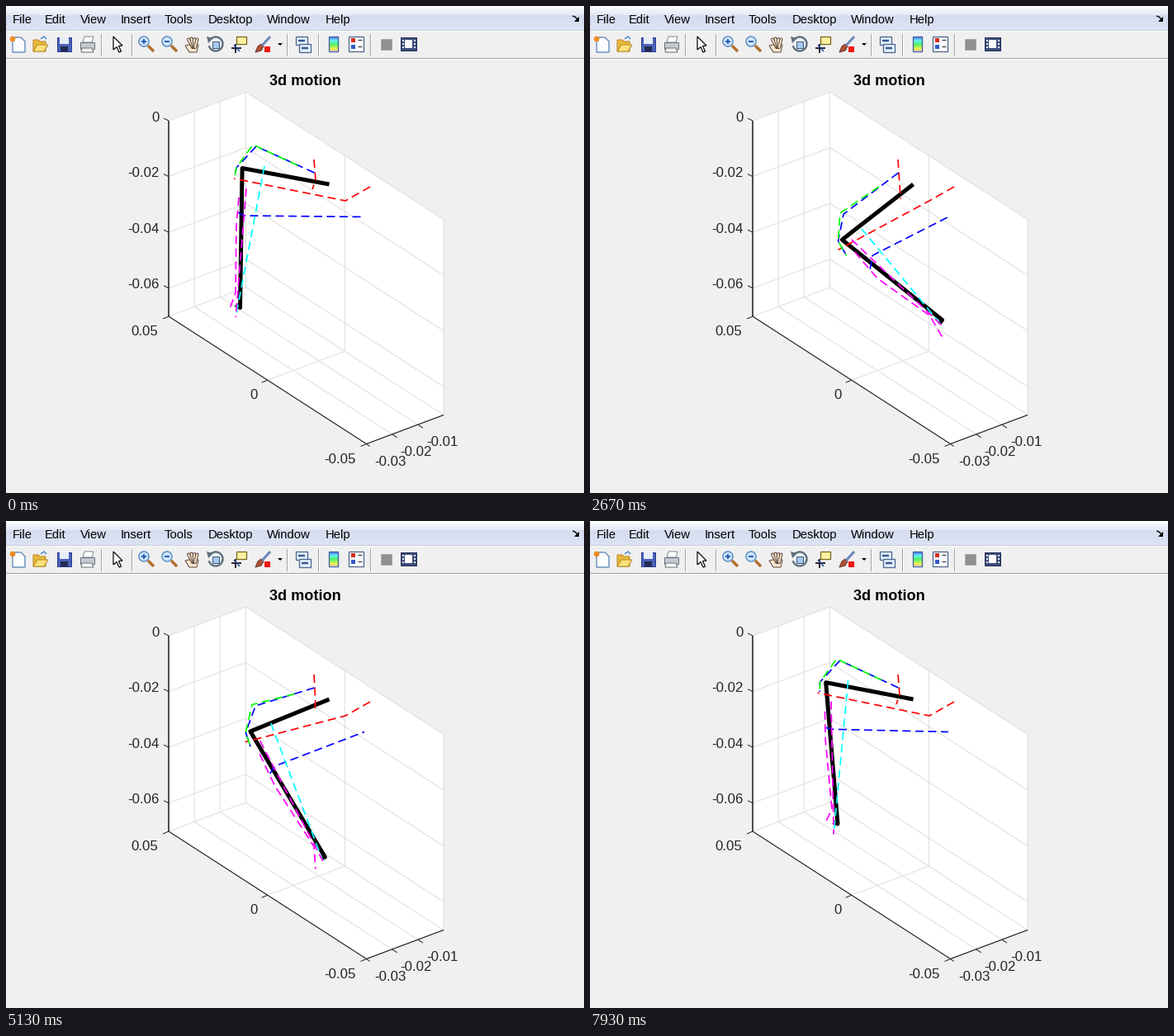
A matplotlib script that plays this animation: 700 px wide and 590 px high, repeating every 8000 ms.

```python
import numpy as np
import matplotlib.pyplot as plt
from matplotlib.animation import FuncAnimation
from matplotlib.patches import Circle, Polygon, Rectangle

W, H, DPI = 700, 590, 100
FRAMES, INTERVAL = 200, 40
POSES = 120                        # distinct leg poses in one loop
PERIOD = 62.5                      # poses per stride
PX = 72 / DPI                      # points per pixel

fig = plt.figure(figsize=(W / DPI, H / DPI), dpi=DPI, facecolor="#f0f0f0")
ax = fig.add_axes([0, 0, 1, 1])
ax.axis("off")


def line(pts, color="#262626", lw=1.0, **kw):
    x, y = zip(*pts)
    kw.setdefault("solid_capstyle", "butt")
    return ax.plot(x, y, color=color, lw=lw * PX, **kw)[0]


def poly(pts, fill, edge="none", lw=1.0):
    ax.add_patch(Polygon(pts, closed=True, fc=fill, ec=edge, lw=lw * PX))


def box(x, y, w, h, fill, edge="none", lw=1.0):
    ax.add_patch(Rectangle((x, y), w, h, fc=fill, ec=edge, lw=lw * PX))


def disc(x, y, r, fill, edge="none", lw=1.0):
    ax.add_patch(Circle((x, y), r, fc=fill, ec=edge, lw=lw * PX))


def text(x, y, s, size, color="#262626", ha="left", weight="normal"):
    ax.text(x, y, s, family="Liberation Sans", fontsize=size * PX,
            color=color, ha=ha, va="baseline", weight=weight)


def ramp(y0, y1, top, bottom):
    col = np.linspace(top, bottom, y1 - y0)[:, None, :] / 255
    ax.imshow(col, extent=(0, W, y1, y0), aspect="auto",
              interpolation="nearest", zorder=0)


# ---------- window chrome ----------
def menu_bar():
    ramp(0, 3, (255, 255, 255), (250, 251, 254))
    ramp(3, 11, (244, 246, 252), (229, 234, 246))
    ramp(11, 29, (213, 220, 239), (220, 227, 244))
    ramp(29, 31, (200, 205, 218), (250, 250, 250))
    for x, s in ((8, "File"), (47, "Edit"), (90, "View"), (139, "Insert"),
                 (192, "Tools"), (245, "Desktop"), (316, "Window"), (387, "Help")):
        text(x - 0.5, 21, s, 14.7, "black")
    line([(686, 12), (689, 13), (692, 16)], "black", 1.4)
    poly([(693.5, 13), (693.5, 18.5), (688, 18.5)], "black")


def magnifier(x, plus):
    line([(x + 2, 48), (x + 9, 55)], "#b07030", 3.5)
    disc(x - 3, 43, 6, "#cfe6fa", "#5c8fc4", 1.5)
    line([(x - 6, 43), (x, 43)], "#2050b0", 1.8)
    if plus:
        line([(x - 3, 40), (x - 3, 46)], "#2050b0", 1.8)


def file_icons():
    poly([(8, 38), (18, 38), (23, 43), (23, 56), (8, 56)], "#fbfdff", "#5b84b8", 1.3)
    disc(8, 40, 3.4, "#f08a24")
    poly([(33, 55), (33, 41), (39, 41), (41, 43), (48, 43), (48, 55)], "#e8b93c", "#b58a20")
    poly([(33, 55), (38, 47), (51, 47), (46, 55)], "#ffe27a", "#b58a20")
    line([(42, 40), (46, 37), (49, 40)], "#4a8ad0", 1.5)
    box(62, 38, 17, 17, "#4a62b8", "#2c3c88")
    box(65, 38, 11, 8, "#e6ecfa")
    box(66, 49, 9, 6, "#222a50")
    poly([(93, 44), (95, 37), (106, 37), (104, 44)], "white", "#808890")
    box(90, 44, 17, 8, "#c4c8d0", "#6c7078")
    poly([(92, 51), (104, 51), (106, 56), (91, 56)], "#f6f6f6", "#6c7078")


def view_icons():
    poly([(130, 37), (130, 53), (134, 49.5), (137, 56), (139.5, 55), (136.5, 48.5),
          (141, 48)], "white", "black", 1.2)
    magnifier(170, True)
    magnifier(198, False)
    for i in range(4):
        x = 221 + 3.5 * i
        line([(x, 39 + abs(i - 1.5)), (226 + i, 50)], "#5a4a40", 4, solid_capstyle="round")
        line([(x, 39 + abs(i - 1.5)), (226 + i, 50)], "#fde6cc", 2, solid_capstyle="round")
    poly([(222, 56), (217, 48), (221, 47), (233, 47), (231, 56)], "#fde6cc", "#5a4a40")
    a = np.radians(np.linspace(-150, 165, 40))
    line(list(zip(254 + 8.5 * np.cos(a), 46 + 8.5 * np.sin(a))), "#5f6f80", 2.4)
    poly([(243, 37), (251, 39), (245, 45)], "#5f6f80")
    box(250, 43, 8, 8, "#a9c8ea", "#3c5c88")
    box(279, 37, 12, 9, "#fff3a0", "#7a6a20", 1.3)
    line([(273, 51), (285, 51)], "black", 1.6)
    line([(278, 46), (278, 57)], "black", 1.6)
    line([(276, 47), (283, 55)], "#2848a0", 1.5)
    line([(320, 37), (310, 48)], "#6888b8", 3)
    poly([(302, 56), (305, 49), (309, 46), (312, 49), (309, 54)], "#b05038", "#703020")
    box(313, 49, 7, 7, "#f01810")
    poly([(329, 45), (335, 45), (332, 48)], "black")


def panel_icons():
    for x, y in ((351, 37), (355, 46)):
        box(x, y, 14, 10, "#e4eefa", "#4a6890", 1.3)
        line([(x + 3, y + 5), (x + 11, y + 5)], "#305890", 2.4)
    for i in range(16):
        c = plt.cm.hsv(0.62 - 0.5 * i / 15)
        box(391, 38 + i, 11, 1.2, tuple(0.6 * v + 0.35 for v in c[:3]))
    box(391, 37, 11, 18, "none", "#4060a0", 1.3)
    box(415, 37, 18, 18, "#f8fafd", "#50688c", 1.3)
    for y, c in ((39, "#d83020"), (47, "#3058c8")):
        box(418, y, 5, 5, c)
        line([(426, y + 2), (431, y + 2)], "#505050", 1.4)
    box(454, 40, 13, 13, "#909090", "#a8a8a8")
    box(478, 38, 19, 16, "#3c4c78", "#28345c")
    box(483, 41, 9, 10, "white")
    for y in (41, 45, 49):
        box(479.5, y, 2, 2, "#dfe6f4")
        box(493.5, y, 2, 2, "#dfe6f4")


def tool_bar():
    box(0, 63, W, 1, "#a0a0a0")
    box(0, 64, W, 1, "white")
    for x in (115, 152, 340, 378, 441):
        box(x, 34, 1, 27, "#a0a0a0")
        box(x + 1, 34, 1, 27, "white")
    file_icons()
    view_icons()
    panel_icons()


# ---------- 3d axes ----------
def axes_box():
    depth, side = np.array([93.5, -35]), np.array([239.5, 154.5])
    top, low = np.array([197, 139]), np.array([197, 376])
    poly([top, top + depth, top + depth + side, low + depth + side, low + side, low], "white")
    grid = "#dedede"
    for k in range(4):
        p = top + [0, 67.6 * k]
        line([p, p + depth, p + depth + side], grid)
        line([p, p - [6, 3]])
        text(185.5, p[1] + 0.5, f"-0.0{2 * k}" if k else "0", 16.7, ha="right")
    for k, s in enumerate(("0.05", "0", "-0.05")):
        p = side * k / 2
        line([low + p, low + depth + p, top + depth + p], grid)
        line([low + p, low + p + [-7, 3]])
        text(184.5 + p[0], 399 + p[1], s, 16.7, ha="right")
    for k in (1, 2, 3):
        p = depth * k / 3
        line([top + p, low + p, low + side + p], grid)
        if k < 3:
            line([low + side + p, low + side + p + [6, 4]])
        text(415 + 31.3 * k, 569 - 12 * k, f"-0.0{4 - k}", 16.7)
    line([top, low], lw=1.6)
    line([low, low + side, low + side + depth], lw=1.2)
    line([low + side, low + side + [4, 3]])
    text(362.5, 96, "3d motion", 18.2, "black", "center", "bold")


# ---------- leg ----------
HIP = np.array([391.5, 216.0])


def wave(*terms):
    """Closed (x, y) path: mean, then cosine and sine parts of each harmonic."""
    def at(f):
        w = 2 * np.pi * f / PERIOD
        basis = [1]
        for n in range(1, len(terms) // 2 + 1):
            basis += [np.cos(n * w), np.sin(n * w)]
        return np.array(basis) @ np.array(terms, float)
    return at


knee = wave((303.4, 255.8), (-25.1, -68), (6.7, 15.8),
            (9.2, 6.9), (-5.2, -3.8), (-1.4, 1.8), (1.8, 0.8))
ankle = wave((379.9, 393.6), (-87.8, -25.2), (10.2, 20.9),
             (-5.9, 0.4), (0, -8.8), (-2.7, -3.3), (0.4, 3.2))
toe = wave((-4, 1.5), (-1.2, -5), (0.8, 0))
heel = wave((-2.5, 7), (-2.8, 4.5), (0, -3))
tip = wave((-7.2, 14.6), (-9.8, -13), (-0.4, 3.4), (3.4, 3), (2.2, 2.4))


def quarter_turn(u):
    """Turn by 90 degrees inside the leg's plane, as seen on screen."""
    dy = -u[0] / 2390
    dz = -(u[1] + 1540 * dy) / 3386
    return np.array([2390 * dz, 1540 * dz - 3386 * dy])


def bone_frame(bone, f):
    k = knee(f)
    u = k - HIP if bone == "femur" else ankle(f) - k
    v = quarter_turn(u)
    return k, np.array([[u[0], v[0], 1, 0], [u[1], v[1], 0, 1]])


def anchor(bone, bent, stretched):
    """Point riding on a bone, set by its place in the two extreme poses."""
    (k0, m0), (k1, m1) = bone_frame(bone, 0), bone_frame(bone, 30)
    c = np.linalg.solve(np.vstack([m0, m1]), np.hstack([bent - k0, stretched - k1]))

    def at(f):
        k, m = bone_frame(bone, f)
        return k + m @ c
    return at


def femur(*places):
    return anchor("femur", *places)


def tibia(*places):
    return anchor("tibia", *places)


def fixed(x, y):
    return lambda f: np.array([x, y], float)


def on_foot(rel):
    return lambda f: ankle(f) + rel(f)


tendon = femur((279, 196), (338, 333))
shin_top = tibia((277, 206), (347, 351))
MUSCLES = [
    ("red", [fixed(373, 186), femur((375, 211), (379, 229)), femur((371, 222), (382, 238))]),
    ("red", [fixed(441, 219), fixed(411, 236), femur((276, 209), (338, 339))]),
    ("blue", [fixed(373.5, 202), femur((303, 170), (337, 310)), tendon, shin_top]),
    ("lime", [femur((353, 193), (358, 241)), femur((299, 168), (333, 310)), tendon, shin_top]),
    ("blue", [tibia((281, 250), (376, 367)), tibia((288, 254), (379, 350)), fixed(434, 255.5)]),
    ("cyan", [femur((313, 194), (360, 313)), on_foot(heel)]),
    ("magenta", [tibia((291, 221), (353, 331)), on_foot(heel)]),
    ("magenta", [tibia((282, 232), (357, 346)), tibia((279, 265), (385, 378)),
                 tibia((278, 347), (450, 423)), on_foot(tip)]),
]
BONES = [fixed(*HIP), knee, ankle, on_foot(toe)]

menu_bar()
tool_bar()
axes_box()
bones = line([(0, 0), (1, 1)], "black", 5, solid_joinstyle="round", zorder=4)
fibres = [line([(0, 0), (1, 1)], color, 1.7, zorder=5, dash_capstyle="butt",
               linestyle=(0, (10 / 1.7, 5.5 / 1.7))) for color, _ in MUSCLES]
ax.set_xlim(0, W)
ax.set_ylim(H, 0)


def draw(frame):
    pose = round(frame * POSES / FRAMES)
    for art, path in zip([bones, *fibres], [BONES, *(p for _, p in MUSCLES)]):
        art.set_data(*np.array([p(pose) for p in path]).T)
    return [bones, *fibres]


anim = FuncAnimation(fig, draw, frames=FRAMES, interval=INTERVAL,
                     init_func=lambda: draw(0), repeat=True, repeat_delay=0)
plt.show()
```
